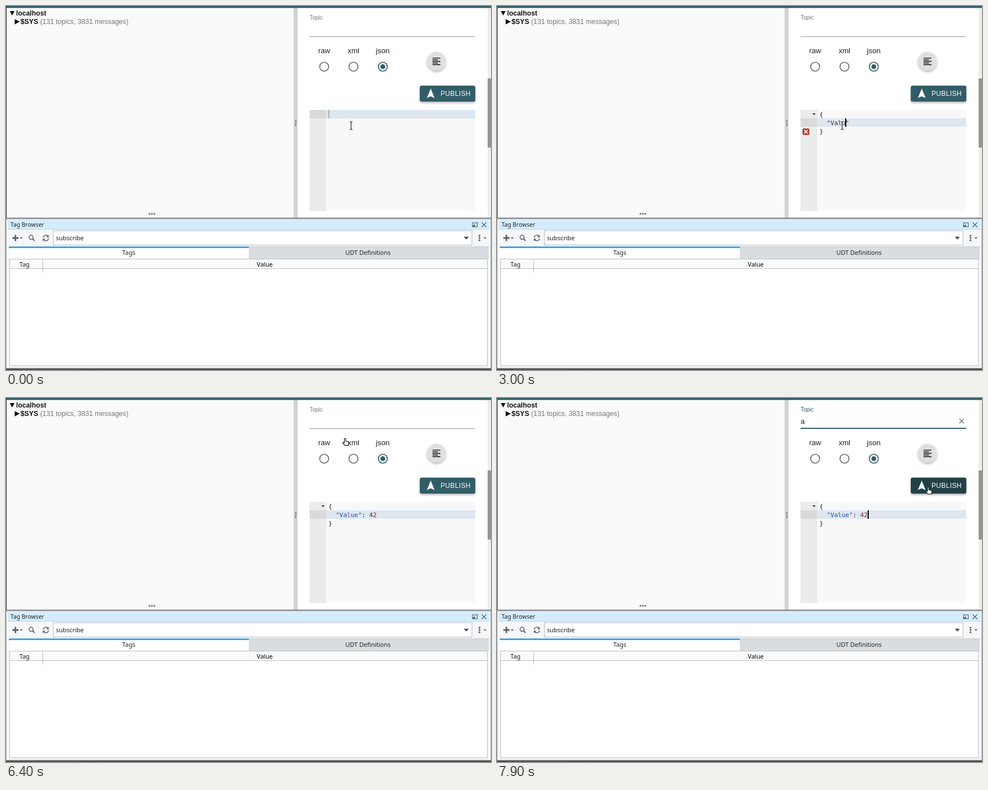
These frames come from a looping animation (865 px wide and 648 px high, 8000 ms). An HTML page:

```html
<!DOCTYPE html>
<html lang="en">
<head>
<meta charset="utf-8">
<title>Publish a value</title>
<style>
  html, body { margin: 0; width: 100%; height: 100%; overflow: hidden; background: #fff; }
  svg { display: block; }
  text { white-space: pre; }
  .tree { font: 12.25px "Liberation Sans", Arial, sans-serif; fill: #757575; }
  .tree .b { font-weight: bold; fill: #111; }
  .form { font: 13.33px "Liberation Sans", Arial, sans-serif; fill: #212121; }
  .mid { text-anchor: middle; }
  .code { font: 11px "DejaVu Sans Mono", monospace; fill: #1a1a1a; }
  .tags { font: 11px "Noto Sans", sans-serif; fill: #222; }
  .tool { fill: none; stroke: #5b6167; stroke-width: 1.5; }
</style>
</head>
<body>
<svg width="865" height="648" viewBox="0 0 865 648">
  <defs>
    <filter id="lift" x="-30%" y="-30%" width="160%" height="180%">
      <feDropShadow dx="0" dy="2" stdDeviation="2" flood-opacity=".32"/>
    </filter>
    <g id="beam" fill="none">
      <path d="M-2.5-7H-1L0-6L1-7H2.5M0-6V6M-2.5 7H-1L0 6L1 7H2.5" stroke="#fff" stroke-width="3" opacity=".75"/>
      <path d="M-2.5-7H-1L0-6L1-7H2.5M0-6V6M-2.5 7H-1L0 6L1 7H2.5" stroke="#222" stroke-width="1.2"/>
    </g>
    <path id="arrow" d="M0 0V13L3 10.2L5 15L7.2 14L5.2 9.4H9.2Z" fill="#111" stroke="#fff"/>
    <path id="hand" d="M-1.2.8Q0-.8 1.2.8V5L5.5 6Q6.7 6.5 6.5 8L5.8 12.5H-.3L-4 8.5Q-4.3 6.8-2.8 7L-1.2 8.2Z"
      fill="#fff" stroke="#111" stroke-width="1.1"/>
  </defs>

  <!-- Topic tree -->
  <rect width="865" height="378" fill="#fff"/>
  <rect width="513" height="377" fill="#fafafa"/>
  <g class="tree">
    <path d="M6.8 9H15.2L11 17Z M15.5 23.3L24.5 28L15.5 32.7Z" fill="#111"/>
    <text x="18" y="16.5" class="b">localhost</text>
    <text x="26" y="32" class="b">$SYS</text>
    <text x="61" y="32">(131 topics, 3831 messages)</text>
  </g>
  <g fill="#858585">
    <circle cx="256" cy="370" r="1.8"/><circle cx="260.3" cy="370" r="1.8"/><circle cx="264.6" cy="370" r="1.8"/>
  </g>
  <rect x="513" width="7" height="377" fill="#d2d2d2"/>
  <g fill="#888">
    <circle cx="516.7" cy="204.5" r="1.6"/><circle cx="516.7" cy="208.5" r="1.6"/><circle cx="516.7" cy="212.5" r="1.6"/>
  </g>
  <rect x="859" width="6" height="377" fill="#ededed"/>
  <rect x="859" y="129" width="6" height="123" fill="#949494"/>
  <rect width="865" height="3.5" fill="#335c67"/>
  <rect y="3" width="1" height="375" fill="#222"/>

  <!-- Publish form -->
  <g class="form">
    <text id="label" x="541.5" y="23.5" font-size="10" style="font-size:10px">Topic</text>
    <text id="topic" x="541.5" y="45.5"></text>
    <rect x="541.5" y="54" width="295.5" height="1" fill="#949494"/>
    <rect id="line" y="53" height="2" fill="#335c67"/>
    <rect id="inputCaret" y="34" width="1" height="14" fill="#111"/>
    <path id="clear" d="M824.7 37.2L832.8 45.3M832.8 37.2L824.7 45.3" stroke="#707070" stroke-width="1.3"/>
    <g class="mid">
      <text x="567.5" y="84">raw</text><text x="619.7" y="84">xml</text><text x="672" y="84">json</text>
    </g>
    <g fill="none" stroke="#707070" stroke-width="1.7">
      <circle cx="567.5" cy="108" r="8"/><circle cx="619.7" cy="108" r="8"/>
      <circle cx="672" cy="108" r="8" stroke="#335c67"/>
    </g>
    <circle cx="672" cy="108" r="4.3" fill="#335c67"/>
    <circle cx="767.7" cy="98.3" r="16.6" fill="#e0e0e0" filter="url(#lift)"/>
    <path d="M760.7 92.7H774.7M760.7 95.7H770.2M760.7 98.6H774.7M760.7 101.5H770.2M760.7 104.4H774.7" stroke="#222" stroke-width="1.6"/>
    <rect id="button" x="738" y="141.7" width="99" height="28.6" rx="3.3" filter="url(#lift)"/>
    <path d="M757.5 147L764.3 163.8L757.5 160.8L750.7 163.8Z" fill="#fff"/>
    <text x="775" y="160" fill="#fff" style="font-size:12px;letter-spacing:.34px;fill:#fff">PUBLISH</text>
  </g>

  <!-- Editor -->
  <rect x="541.5" y="185" width="295.5" height="180" fill="#f8f8f8"/>
  <rect x="541.5" y="185" width="29.8" height="180" fill="#ebebeb"/>
  <g id="active">
    <rect x="541.5" y="185" width="29.8" height="15" fill="#dadada"/>
    <rect x="571.3" y="185" width="265.7" height="15" fill="#dee6ef"/>
  </g>
  <g class="code">
    <path id="fold" d="M562.3 191H568.3L565.3 194.2Z" fill="#333"/>
    <text id="open" x="575" y="197">{</text>
    <rect id="match" x="575.5" y="199" width="6" height="1" fill="#aaa"/>
    <text x="588.2" y="212"><tspan id="key"></tspan><tspan id="colon"></tspan><tspan id="num" fill="#7c2029"></tspan></text>
    <text id="close" x="575" y="227">}</text>
  </g>
  <g id="error">
    <rect x="545.5" y="187.5" width="11" height="10.5" rx="1" fill="#d1472f" stroke="#9c3a28"/>
    <path d="M548.3 190L553.7 195.5M553.7 190L548.3 195.5" stroke="#fff" stroke-width="1.7"/>
  </g>
  <rect id="caret" height="15"/>

  <!-- Tag browser -->
  <rect y="377" width="865" height="271" fill="#e9edf0"/>
  <rect y="377" width="865" height="1.2" fill="#4a4d50"/>
  <rect x=".5" y="379.5" width="864" height="265" fill="#f5f7f9" stroke="#aab4bc"/>
  <rect x="3" y="381" width="859" height="16.5" fill="#d4edfe"/>
  <rect x="3" y="397" width="859" height="1" fill="#c3d4df"/>
  <g class="tags">
    <text x="8" y="393" style="font-size:10.4px">Tag Browser</text>
    <g fill="none" stroke="#4b5258" stroke-width="1.1">
      <path d="M832 386H840.5V393H832ZM833 392L835.7 389.5V392Z"/>
      <path d="M848.3 385.3L856.5 393.5M856.5 385.3L848.3 393.5"/>
    </g>
    <path d="M11.3 413H22.3M16.8 407.5V418.5" class="tool" style="stroke-width:2.8"/>
    <path d="M24.5 411.7H30L27.2 414.7ZM851.5 411.7H857L854.2 414.7Z" fill="#5b6167"/>
    <circle cx="44.8" cy="411.8" r="3.7" class="tool"/>
    <path d="M47.6 414.6L51 418" class="tool" style="stroke-width:2"/>
    <path d="M66.3 412.3A4.8 4.8 0 0 1 75 410M75.7 413.7A4.8 4.8 0 0 1 67 416" class="tool"/>
    <path d="M76.3 407.3V411.8H71.8ZM65.7 418.7V414.2H70.2Z" fill="#5b6167"/>
    <rect x="84.5" y="400" width="746.5" height="25.5" fill="#fff" stroke="#b3babf"/>
    <text x="89" y="417">subscribe</text>
    <path d="M816.5 410.7H825.5L821 415.7Z" fill="#444b50"/>
    <path d="M843 407.7H846V410.3H843ZM843 411.7H846V414.3H843ZM843 415.7H846V418.3H843Z" fill="#4f565c"/>
    <rect x="5" y="428" width="428" height="22" fill="#fff"/>
    <rect x="5" y="428" width="428" height="3" fill="#46a3d6"/>
    <rect x="433" y="428.5" width="428" height="21.5" fill="#d9dde0"/>
    <rect x="433" y="428" width="428" height="1" fill="#c2c8cc"/>
    <text x="219" y="442.5" class="mid">Tags</text>
    <text x="645.7" y="442.5" class="mid">UDT Definitions</text>
    <rect x="6.5" y="450.5" width="852" height="190" fill="#fff" stroke="#b9bfc4"/>
    <rect x="7" y="451" width="851" height="16" fill="#fafafa"/>
    <path d="M7 467.5H858M65.5 451V474.5M858.5 451V474.5" stroke="#b9bfc4"/>
    <text x="33" y="463.5" class="mid">Tag</text>
    <text x="461.5" y="463.5" class="mid" style="fill:#000">Value</text>
  </g>
  <rect y="645.3" width="865" height="3" fill="#4b4847"/>
  <path d="M30 647.5H128M161 647.5H165" stroke="#686462" stroke-dasharray="5 3"/>
  <use id="mouse"/>
</svg>

<script>
const LOOP = 8000, TICK = 100, CHAR = 6.62, ROW = 15.3;
const TEAL = '#335c67';
const el = {};
document.querySelectorAll('[id]').forEach(e => el[e.id] = e);

// time, second line, caret column
const typing = [
  [0, '', 0], [1200, '', 1], [1500, '', 2], [1800, '""', 3],
  [2400, '"V"', 4], [2600, '"Va"', 5], [2900, '"Val"', 6], [3000, '"Valu"', 7],
  [3200, '"Value"', 8], [3700, '"Value"', 9], [3900, '"Value":', 10],
  [4200, '"Value": ', 11], [5200, '"Value": 4', 12], [5400, '"Value": 42', 13]
];
const caretLook = [[0, 'dim'], [200, 'on'], [900, 'off'], [1200, 'on'], [4900, 'off'],
  [5200, 'on'], [6000, 'off'], [6500, 'on'], [6700, 'dim'], [7900, 'on']];
const errorRow = [[0, -1], [1400, 0], [1600, -1], [2000, 2], [5400, -1]];
const moves = [
  { from: 5900, to: 6600, a: [615.5, 213], b: [602, 37] },
  { from: 7100, to: 7700, a: [602, 37], b: [769, 158.5] }
];

const at = (table, t) => table.filter(s => s[0] <= t).pop();
const ramp = (t, a, b) => Math.min(1, Math.max(0, (t - a) / (b - a)));
const ease = p => p * p * (3 - 2 * p);
const show = (e, on) => e.setAttribute('visibility', on ? 'visible' : 'hidden');
const set = (e, attrs) => { for (const k in attrs) e.setAttribute(k, attrs[k]); };
const inside = (x, y, l, t, r, b) => x >= l && x <= r && y >= t && y <= b;

function pointerAt(t) {
  const m = t < 7100 ? moves[0] : moves[1];
  const p = ease(ramp(t, m.from, m.to));
  return m.a.map((v, i) => v + (m.b[i] - v) * p);
}

function pointerKind(x, y) {
  if (inside(x, y, 541, 185, 837, 365) || inside(x, y, 541, 27, 822, 55)) return '#beam';
  const hot = inside(x, y, 550, 70, 690, 124) || inside(x, y, 738, 142, 837, 170) ||
    Math.hypot(x - 768, y - 98) < 17;
  return hot ? '#hand' : '#arrow';
}

function drawEditor(t) {
  const [, text, col] = at(typing, t);
  const row = t >= 1500 ? 1 : 0;
  const [key, rest = ''] = text.split(':');
  el.key.textContent = key;
  el.key.setAttribute('fill', t >= 3900 ? '#264f9e' : '#333');
  el.colon.textContent = text.includes(':') ? ': ' : '';
  el.num.textContent = rest.trim();
  show(el.open, t >= 1200);
  show(el.fold, t >= 1300);
  show(el.match, t >= 1200 && t < 1500);
  show(el.close, row);
  el.active.setAttribute('transform', `translate(0 ${row * 15})`);

  const look = at(caretLook, t)[1];
  show(el.caret, look !== 'off');
  set(el.caret, {
    x: Math.round(575 + col * CHAR - .3), y: 185 + row * 15,
    width: look === 'dim' ? 1.5 : 2, fill: look === 'dim' ? '#9aa3ab' : '#000'
  });

  const err = at(errorRow, t)[1];
  show(el.error, err >= 0);
  el.error.setAttribute('transform', `translate(0 ${Math.round(Math.max(0, err) * ROW)})`);
}

function drawForm(t) {
  const focus = t >= 6700, typed = t >= 7100;
  const w = 295.5 * ease(ramp(t, 6650, 6900));
  set(el.line, { x: 541.5 + (295.5 - w) / 2, width: w });
  el.label.style.fill = focus ? TEAL : '#757575';
  el.topic.textContent = typed ? 'a' : '';
  show(el.clear, typed);
  show(el.inputCaret, focus && t < 7600);
  el.inputCaret.setAttribute('x', typed ? 549 : 541);

  const h = ease(ramp(t, 7550, 7800));
  const mix = (a, b) => Math.round(a + (b - a) * h);
  el.button.setAttribute('fill', `rgb(${mix(51, 33)},${mix(92, 63)},${mix(103, 71)})`);
}

function draw(now) {
  const t = Math.floor(now % LOOP / TICK) * TICK;
  drawEditor(t);
  drawForm(t);
  const [x, y] = pointerAt(t);
  set(el.mouse, { href: pointerKind(x, y), transform: `translate(${x} ${y})` });
}

const start = performance.now();
function loop(now) {
  draw(Math.max(0, now - start));
  requestAnimationFrame(loop);
}
draw(0);
requestAnimationFrame(loop);
</script>
</body>
</html>
```
